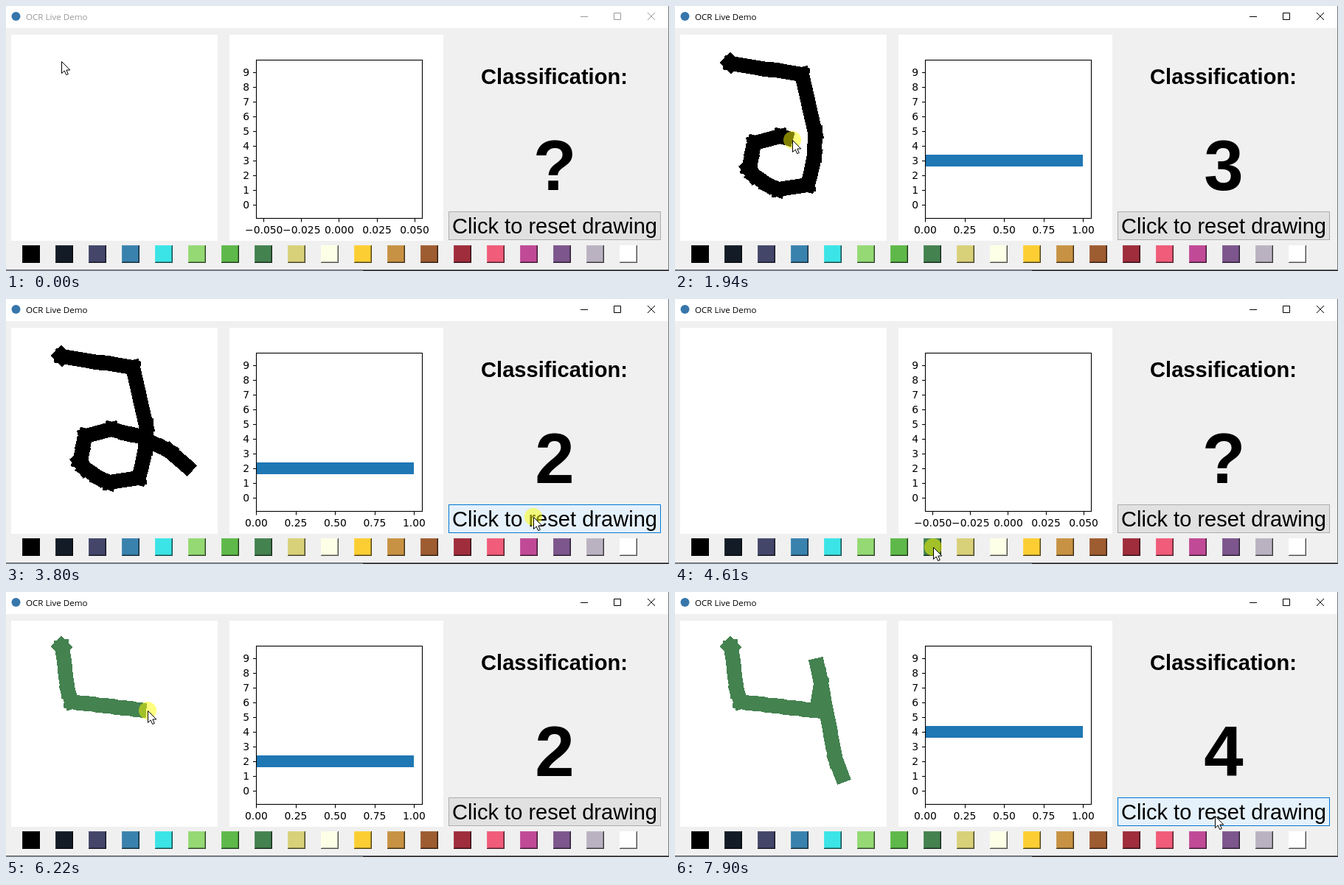
Write an HTML page that moves like this. It is 899 px wide and 360 px high and loops after 8 s.

```html
<!DOCTYPE html>
<html lang="en">
<head>
<meta charset="utf-8">
<title>OCR Live Demo</title>
<style>
  html, body { margin: 0; width: 100%; height: 100%; overflow: hidden; background: #f0f0f0; }
  svg { display: block; }
  .title { font: 11.6px "Open Sans", sans-serif; }
  .plot text { font: 13.89px "DejaVu Sans", sans-serif; }
  .label, .result, .reset { font: 29.1px "Liberation Sans", Arial, sans-serif; text-anchor: middle; }
  .label, .result { font-weight: bold; }
  .result { font-size: 96px; }
  .ink { fill: none; stroke-width: 20; stroke-linecap: square; }
</style>
</head>
<body>
<svg width="899" height="360" viewBox="0 0 899 360">
  <rect width="899" height="360" fill="#f0f0f0"/>
  <rect width="899" height="30" fill="#fff"/>
  <circle cx="13.5" cy="14" r="6" fill="#3776ab"/>
  <g id="bar">
    <text class="title" x="27" y="19" stroke="none">OCR Live Demo</text>
    <path d="M779 14.5h10M824.5 9.5h9v9h-9zM870 9l10 10M880 9l-10 10" fill="none"/>
  </g>

  <rect x="7" y="39" width="280" height="280" fill="#fff"/>
  <path id="black" class="ink" stroke="#000" shape-rendering="crispEdges"/>
  <path id="green" class="ink" stroke="#448250" shape-rendering="crispEdges"/>

  <g class="plot">
    <rect x="303" y="39" width="290" height="280" fill="#fff"/>
    <rect id="score" x="339" width="214" height="16" fill="#1f77b4"/>
    <rect x="339.5" y="73.5" width="225" height="215" fill="none" stroke="#000" stroke-width="1.1"/>
    <g id="yAxis" text-anchor="end"></g>
    <g id="xIdle" text-anchor="middle"></g>
    <g id="xScore" text-anchor="middle"></g>
  </g>

  <text class="label" x="743.5" y="106">Classification:</text>
  <text id="result" class="result" x="744" y="250"></text>
  <rect id="button" x="600.5" y="279.5" width="287" height="38"/>
  <text class="reset" x="744" y="309">Click to reset drawing</text>

  <g id="palette" shape-rendering="crispEdges"></g>
  <g shape-rendering="crispEdges">
    <rect y="358" width="899" height="1" fill="#5c6066"/>
    <rect y="359" width="484" height="1" fill="#8c929a"/>
    <rect x="484" y="359" width="415" height="1" fill="#2c2624"/>
    <rect x="898" width="1" height="359" fill="#77797c"/>
  </g>

  <g id="pointer">
    <circle id="press" r="12" fill="#ff0" fill-opacity=".5"/>
    <path d="M.5 .5V16.5L4.2 13 6.7 18.6 9.3 17.5 6.9 12H11.8Z" fill="#fff" stroke="#000"/>
  </g>
</svg>
<script>
const LOOP = 8000, START = 90, STEP = 76.6, RESET = 3840;
const SAMPLE = 60, LAG = 50;
const $ = id => document.getElementById(id);
const set = (id, name, value) => $(id).setAttribute(name, value);
const show = (id, on) => set(id, "visibility", on ? "visible" : "hidden");

function add(parent, tag, attrs, text) {
  const el = document.createElementNS("http://www.w3.org/2000/svg", tag);
  for (const k in attrs) el.setAttribute(k, attrs[k]);
  if (text) el.textContent = text;
  parent.appendChild(el);
}

function tickMark(axis, d, x, y, text) {
  add(axis, "path", { d, stroke: "#000", "stroke-width": 1.1 });
  add(axis, "text", { x, y }, text);
}

function xAxis(axis, left, gap, low, step, digits) {
  for (let i = 0; i < 5; i++) {
    const x = left + gap * i;
    const text = (low + step * i).toFixed(digits).replace("-", "\u2212");
    tickMark(axis, `M${Math.floor(x) + .5} 289v4.5`, x, 309, text);
  }
}

for (let n = 0; n < 10; n++) {
  const y = 270.5 - 20 * n;
  tickMark($("yAxis"), `M335 ${y}h4.5`, 330, y + 4.5, String(n));
}
xAxis($("xIdle"), 349.7, 51.1, -.05, .025, 3);
xAxis($("xScore"), 339.5, 53.5, 0, .25, 2);

// Colour buttons with a dark lower right edge
("000000 131c26 434669 3a82ae 3be4e6 94d974 5fb94a 448250 d9d07a fdffe6 " +
 "fcce34 c79243 9e5c31 9f2d3c f05c79 c04a96 7c568d bab2c1 ffffff").split(" ").forEach((c, i) => {
  const g = $("palette"), x = 22 + 45 * i;
  const edge = (d, stroke, opacity) => add(g, "path", { d, stroke, "stroke-opacity": opacity, fill: "none" });
  add(g, "rect", { x, y: 325, width: 24, height: 24, fill: "#" + c });
  edge(`M${x + .5} 348V325.5H${x + 23}`, "#fff", .1);
  edge(`M${x + 1} 347.5H${x + 22.5}V326`, "#000", .3);
  edge(`M${x} 348.5H${x + 23.5}V325`, "#000", .7);
});

// Pointer moves: end time, corners passed at even speed, button state
const moves = [
  [90, "75,77"],
  [400, "76,78", "black"],
  [850, "172,93", "black"],
  [1392, "190,172 189,203 180,243 140,249 126,243 107,230", "black"],
  [2460, "100,220 108,186 143,177 185,188 222,207 245,227", "black"],
  [2560, "245,230"],
  [2848, "575,270"],
  [3154, "715,296"],
  [3760, "715,296"],
  [3900, "715,296", "click"],
  [4440, "350,337"],
  [4600, "350,337"],
  [4680, "350,337", "click"],
  [5375, "66,76"],
  [5450, "75,74"],
  [5500, "76,75", "green"],
  [5758, "84,134 89,149", "green"],
  [6220, "192,161", "green"],
  [6480, "198,125 193,100", "green"],
  [6820, "204,157 218,228 226,249", "green"],
  [6985, "226,249", "green"],
  [7060, "251,255"],
  [7500, "600,318"],
  [7830, "732,304"],
  [LOOP, "732,304"]
];
const results = [[0, "?"], [400, "2"], [1010, "7"], [1540, "3"], [2080, "2"],
  [RESET, "?"], [5600, "2"], [6520, "4"]];

// The mouse reports whole pixels at regular times
const track = [{ t: 0, x: 75, y: 75 }];
for (const [end, corners, state] of moves) {
  let from = track[track.length - 1];
  const span = end - from.t;
  const legs = corners.split(" ").map(corner => {
    const [x, y] = corner.split(",").map(Number);
    const leg = { from, x, y, length: Math.hypot(x - from.x, y - from.y) };
    from = leg;
    return leg;
  });
  const total = legs.reduce((sum, leg) => sum + leg.length, 0);
  for (const leg of legs) {
    const time = total ? span * leg.length / total : span;
    const count = Math.max(1, Math.round(time / SAMPLE));
    const t0 = track[track.length - 1].t;
    for (let i = 1; i <= count; i++) {
      const k = i / count;
      track.push({
        t: t0 + time * k,
        x: Math.round(leg.from.x + (leg.x - leg.from.x) * k),
        y: Math.round(leg.from.y + (leg.y - leg.from.y) * k),
        state
      });
    }
  }
}

function between(a, b, t) {
  const k = Math.min(1, (t - a.t) / (b.t - a.t));
  return [a.x + (b.x - a.x) * k, a.y + (b.y - a.y) * k];
}

// Every piece of a stroke has its own square ends
function inkPath(color, t) {
  let d = "";
  for (let i = 1; i < track.length && track[i - 1].t < t; i++) {
    const a = track[i - 1], b = track[i];
    if (b.state !== color || (a.x === b.x && a.y === b.y)) continue;
    d += `M${a.x} ${a.y}L${between(a, b, t)}`;
  }
  return d;
}

function draw(time) {
  const t = time < START ? 0 : Math.min(LOOP - 1, START + STEP * Math.floor((time - START + 8) / STEP));
  const i = track.findIndex(p => p.t > t);
  const [x, y] = between(track[i - 1], track[i], t);
  const result = results.filter(r => r[0] <= t).pop()[1];
  const idle = result === "?";
  const over = x >= 600 && x < 888 && y >= 279 && y < 318;
  const tone = t ? "#000" : "#999";

  set("bar", "fill", tone);
  set("bar", "stroke", tone);
  set("black", "d", t < RESET ? inkPath("black", t - LAG) : "");
  set("green", "d", inkPath("green", t - LAG));
  $("result").textContent = result;
  set("score", "y", idle ? 0 : 262 - 20 * result);
  show("score", !idle);
  show("xScore", !idle);
  show("xIdle", idle);
  set("button", "fill", over ? "#e5f1fb" : "#e1e1e1");
  set("button", "stroke", over ? "#0078d7" : "#adadad");
  set("pointer", "transform", `translate(${Math.round(x)} ${Math.round(y)})`);
  show("press", Boolean(track[i].state));
}

const begin = performance.now();
function tick() {
  draw((performance.now() - begin) % LOOP);
  requestAnimationFrame(tick);
}
tick();
</script>
</body>
</html>
```
